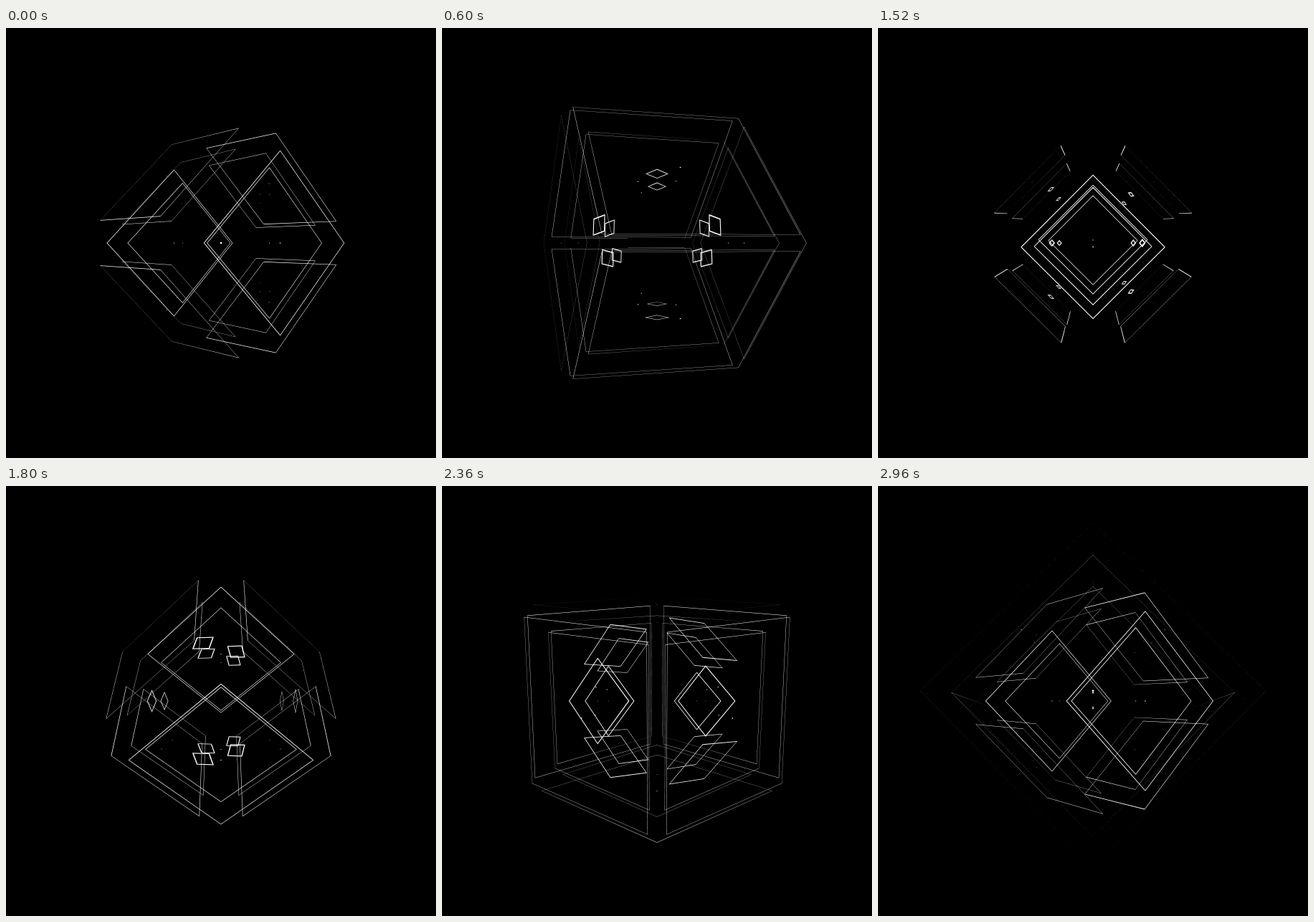
An HTML page with a canvas that plays this animation: 600 by 600 pixels, repeating every 3000 ms.

```html
<!DOCTYPE html>
<html lang="en">
<head>
<meta charset="utf-8">
<title>Unfolding cubes</title>
<style>
  html, body { margin: 0; width: 100%; height: 100%; overflow: hidden; background: #000; }
  canvas { display: block; width: 600px; height: 600px; }
</style>
</head>
<body>
<canvas id="stage" width="600" height="600"></canvas>
<script>
const ctx = document.getElementById("stage").getContext("2d");
const LOOP = 3000, STEP = 40, CENTER = 300;
const CAMERA = 870, RADIUS = 95.6, STROKE = 2;
const ECHOES = [1, 0.818];
const CORNERS = [[-1, -1], [1, -1], [1, 1], [-1, 1]];

const smooth = t => t * t * (3 - 2 * t);
const mix = (u, a, v, b) => u.map((n, i) => n * a + v[i] * b);

function fillPoly(points) {
  ctx.beginPath();
  points.forEach(([x, y]) => ctx.lineTo(x, y));
  ctx.closePath();
  ctx.fill();
}

// Flat frame whose border lies in the plane of the face.
function drawFrame(square, half, width) {
  const outer = square(half + width / 2);
  if (half <= width / 2) {
    fillPoly(outer);
    return;
  }
  const inner = square(half - width / 2);
  for (let i = 0; i < 4; i++) {
    const j = (i + 1) % 4;
    fillPoly([outer[i], outer[j], inner[j], inner[i]]);
  }
}

function drawCube(t, swap) {
  const angle = t * 2 * Math.PI;
  const sin = Math.sin(angle), cos = Math.cos(angle), r = Math.SQRT1_2;
  const v = [0, sin, cos];
  const a = [r, -cos * r, sin * r];
  const b = [r, cos * r, -sin * r];
  const dist = RADIUS * (1 + t / 2);
  const half = dist * smooth(t);

  for (const echo of ECHOES) {
    const project = ([x, y, z]) => {
      const k = echo * CAMERA / (CAMERA - z);
      return swap
        ? [CENTER + y * k, CENTER + x * k]
        : [CENTER + x * k, CENTER + y * k];
    };
    for (const [n, p, q] of [[v, a, b], [a, b, v], [b, v, a]]) {
      for (const side of [-1, 1]) {
        const square = size => CORNERS.map(([i, j]) =>
          project(mix(n, side * dist, mix(p, i * size, q, j * size), 1)));
        drawFrame(square, half, STROKE * (1 - t));
        if (t > 0) fillPoly(square(t * STROKE / 2));
      }
    }
  }
}

function draw(now) {
  const time = Math.floor((now % LOOP) / STEP) * STEP;
  ctx.fillStyle = "#000";
  ctx.fillRect(0, 0, 600, 600);
  ctx.fillStyle = "#fff";
  drawCube(time / LOOP, false);
  drawCube(((time + 1800) % LOOP) / LOOP, true);
}

const start = performance.now();
function tick() {
  draw(performance.now() - start);
  requestAnimationFrame(tick);
}
tick();
</script>
</body>
</html>
```
